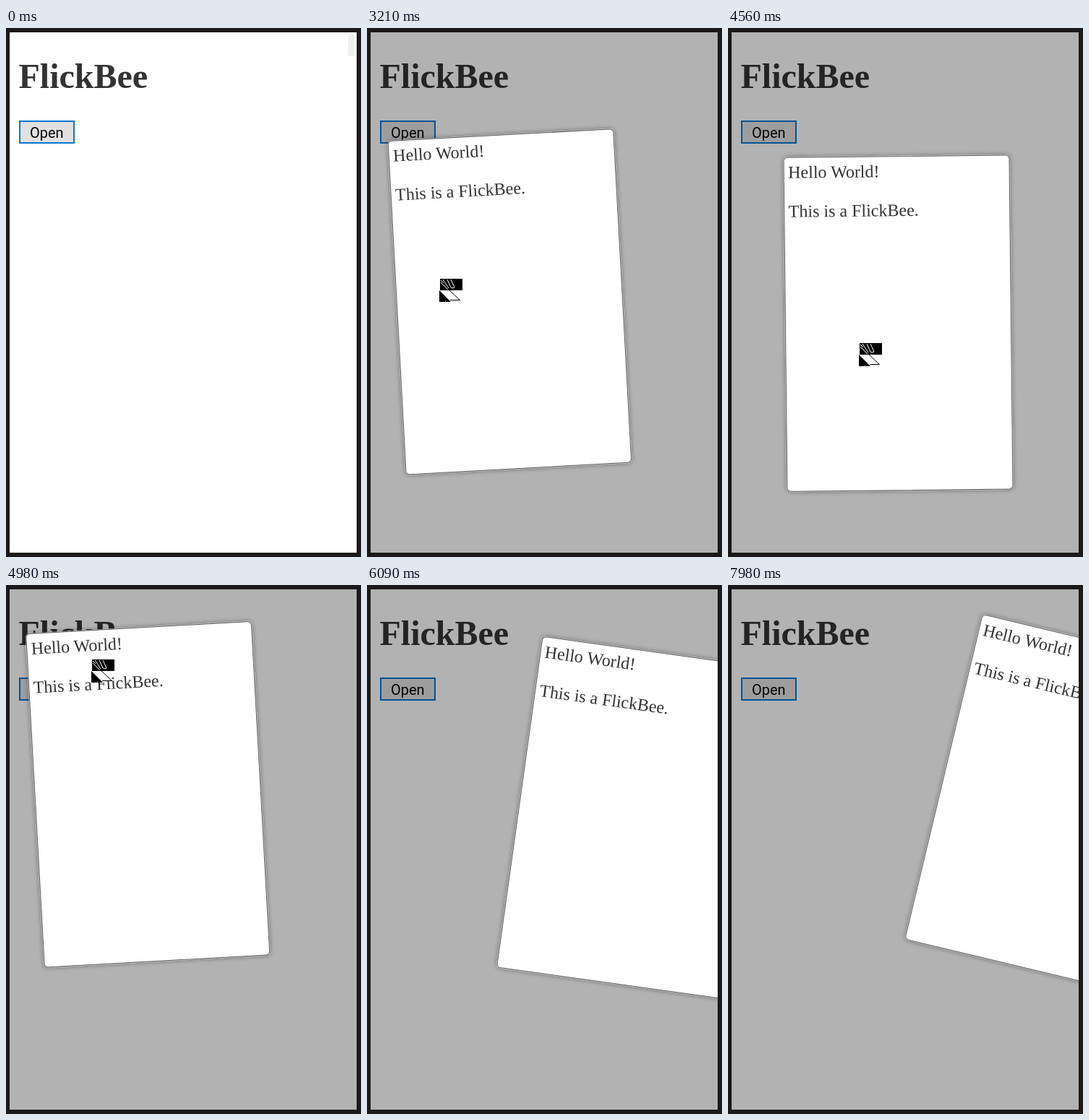
An HTML page for the animation above (8000 ms loop, 491 px wide and 732 px high).

```html
<!DOCTYPE html>
<html lang="en">
<head>
<meta charset="utf-8">
<title>FlickBee</title>
<style>
  html, body { margin: 0; width: 100%; height: 100%; overflow: hidden; background: #1b1919; }
  svg { display: block; width: 491px; height: 732px; }
  text { white-space: pre; }
  .serif { font-family: "Liberation Serif", "Times New Roman", serif; fill: #333; }
  .sans { font-family: Roboto, Tahoma, sans-serif; font-size: 20px; fill: #000; }
</style>
</head>
<body>
<svg viewBox="0 0 491 732">
  <defs>
    <clipPath id="window"><rect x="5" y="6" width="480" height="720"/></clipPath>
    <filter id="shadow" x="-10%" y="-10%" width="120%" height="120%">
      <feDropShadow dx="0" dy="0" stdDeviation="3" flood-opacity=".45"/>
    </filter>
  </defs>
  <g clip-path="url(#window)">
    <rect x="5" y="6" width="480" height="720" fill="#fff"/>
    <text class="serif" x="17.5" y="83" font-size="48" font-weight="bold">FlickBee</text>
    <rect id="buttonEdge" x="18" y="128" width="77" height="32"/>
    <rect id="buttonFace"/>
    <text class="sans" x="56.3" y="152" text-anchor="middle">Open</text>
    <rect id="scrollbar" x="473" y="9" width="9" height="30" rx="4" fill="#efefef"/>
    <g id="modal">
      <rect x="5" y="6" width="480" height="720" opacity=".3"/>
      <g id="card">
        <rect x="-156.5" y="-231.5" width="313" height="463" rx="5" fill="#fff" filter="url(#shadow)"/>
        <rect x="-156" y="-231" width="312" height="462" rx="5" fill="none" stroke="#5a5a5a"/>
        <g class="serif" font-size="24">
          <text x="-150" y="-202.5">Hello World!</text>
          <text x="-150" y="-148.5">This is a FlickBee.</text>
        </g>
      </g>
    </g>
  </g>
  <g id="cursor">
    <path d="M1 0H32V16H1Z"/>
    <path d="M2 5L12 15M2 2L6 6M5 1L13 13M11 1L16 12Q18 14 21 12L16 1" fill="none" stroke="#fff"/>
    <path d="M0 16H13L29 30H16L14 32H0Z" fill="#fff"/>
    <path d="M0 16L16 32H9L8 30V32H0Z"/>
    <path d="M13 15L28.5 29.5H15" fill="none" stroke="#000"/>
  </g>
</svg>
<script>
const LOOP = 8000, STEP = 30;
const APPEAR = 690, PRESS = 1800, OPEN = 2040;
const DRAG = 0.4, TILT = 0.0655;
const GRABS = [{ from: 3000, to: 6060 }, { from: 7170, to: LOOP }];

// Turning points [time, position] of the hand on each axis
const turnsX = [
  [APPEAR, 368], [1410, 75], [2370, 75], [2760, 220], [3000, 220], [3180, 101],
  [3580, 62], [4260, 430], [4590, 176], [4830, 60], [5300, 310], [5520, 208],
  [6060, 522], [6840, 308], [7170, 308], [7500, 34], [7920, 519]
];
const turnsY = [
  [APPEAR, 216], [1410, 154], [2370, 154], [2760, 316], [3000, 316], [3180, 348],
  [4110, 30], [4600, 443], [5060, 76], [5360, 575], [5530, 140],
  [6060, 205], [6840, 197], [7170, 197], [7500, 246], [7920, 147]
];

const $ = id => document.getElementById(id);
const clamp = (v, lo, hi) => Math.min(hi, Math.max(lo, v));

function setAttrs(el, attrs) {
  for (const name in attrs) el.setAttribute(name, attrs[name]);
}

// Half a cosine wave from each turning point to the next
function swing(turns, t) {
  const next = turns.findIndex(([time]) => time > t);
  if (next < 0) return turns[turns.length - 1][1];
  if (next === 0) return turns[0][1];
  const [start, from] = turns[next - 1], [end, to] = turns[next];
  const u = (t - start) / (end - start);
  return from + (to - from) * (1 - Math.cos(Math.PI * u)) / 2;
}

const pointer = t => [swing(turnsX, t), swing(turnsY, t)];

// The card follows each grab one step late and keeps its place when let go
function cardOffset(t) {
  let x = 0, y = 0;
  for (const { from, to } of GRABS) {
    const start = pointer(from), now = pointer(clamp(t - STEP, from, to));
    x += DRAG * (now[0] - start[0]);
    y += DRAG * (now[1] - start[1]);
  }
  return [x, y];
}

function drawButton(t, x, y) {
  const hover = t >= APPEAR && t < OPEN && x + 6 < 95 && y < 160;
  const pressed = hover && t >= PRESS;
  const edge = hover ? 1 : 2;
  setAttrs($("buttonEdge"), { fill: pressed ? "#005499" : "#0078d7" });
  setAttrs($("buttonFace"), {
    x: 18 + edge, y: 128 + edge, width: 77 - 2 * edge, height: 32 - 2 * edge,
    fill: pressed ? "#cce4f7" : hover ? "#e5f1fb" : "#e1e1e1"
  });
}

function draw(time) {
  const t = Math.floor(time / STEP) * STEP;
  const [x, y] = pointer(t);
  const [dx, dy] = cardOffset(t);
  const show = (id, on) => setAttrs($(id), { display: on ? "inline" : "none" });
  drawButton(t, x, y);
  show("scrollbar", t < OPEN);
  show("modal", t >= OPEN);
  show("cursor", t >= APPEAR);
  setAttrs($("card"), { transform: `translate(${245 + dx} ${366 + dy}) rotate(${dx * TILT})` });
  setAttrs($("cursor"), { transform: `translate(${Math.round(x)} ${Math.round(y)})` });
}

const began = performance.now();
function tick() {
  draw((performance.now() - began) % LOOP);
  requestAnimationFrame(tick);
}
tick();
</script>
</body>
</html>
```
